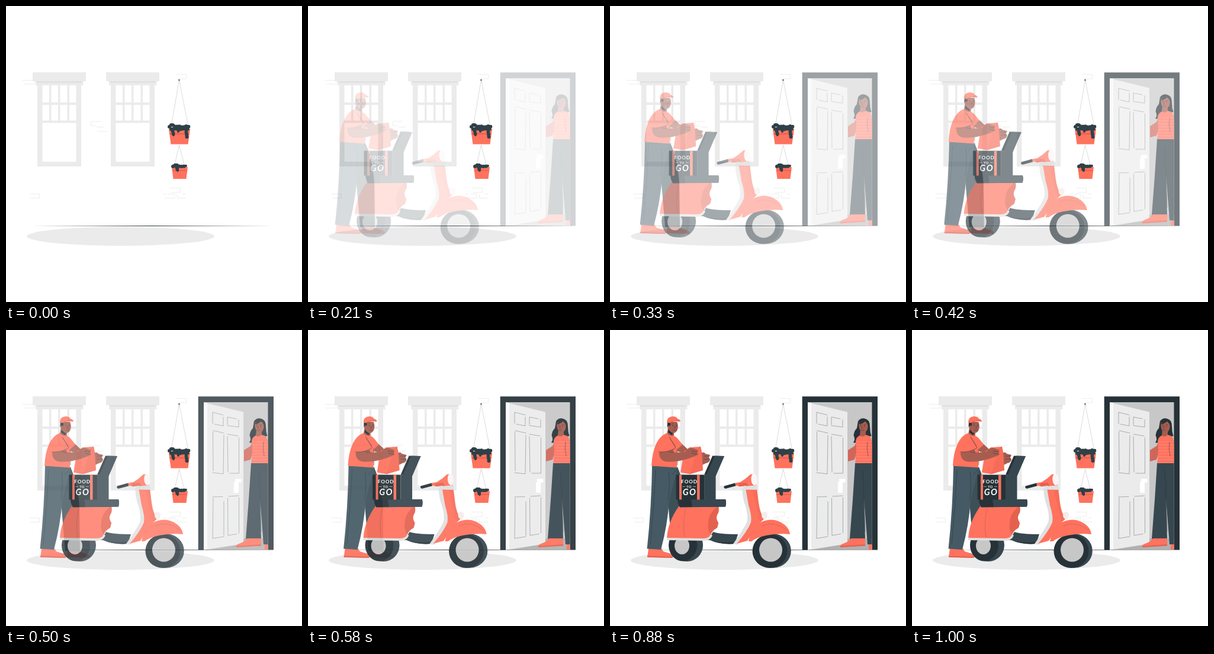
Write an HTML page that moves like this. It is 500 px wide and 500 px high and loops after 1.04 s.

```html
<!DOCTYPE html>
<html lang="en">
<head>
<meta charset="utf-8">
<title>Food delivery</title>
<style>
html, body { margin: 0; width: 100%; height: 100%; overflow: hidden; background: #fff; }
svg { display: block; width: 100%; height: 100%; }
.ink { fill: #263238; } .slate { fill: #37474f; } .coral { fill: #ff725e; } .shade { fill: #e4614f; }
.skin { fill: #a65d50; } .pale { fill: #ebebeb; } .white { fill: #fff; } .rim { fill: #c7c7c7; } .grey { fill: #e0e0e0; }
.thin { fill: none; stroke: #263238; stroke-width: .5; stroke-linecap: round; stroke-linejoin: round; }
.leaf { fill: none; stroke: #2f4047; stroke-linecap: round; stroke-linejoin: round; }
text { font-family: Lato, "Open Sans", sans-serif; font-weight: 700; fill: #fff; text-anchor: middle; }
</style>
</head>
<body>
<svg viewBox="0 0 500 500">
  <defs>
    <g id="window">
      <path class="pale" d="M45 112H135V127H45ZM50 127H130.500V134H50ZM53 134H127V271H53Z"/>
      <path class="grey" d="M50 127H130.500L127 129.500H53Z"/>
      <path class="white" d="M61.500 134H73V163H61.500ZM76.500 134H88V163H76.500ZM91.500 134H103.500V163H91.500ZM107 134H118.500V163H107ZM61.500 167H73V193.500H61.500ZM76.500 167H88V193.500H76.500ZM91.500 167H103.500V193.500H91.500ZM107 167H118.500V193.500H107ZM61.500 197.500H118.500V263H61.500Z"/>
    </g>
  </defs>

  <use href="#window"/>
  <use href="#window" x="124"/>
  <path fill="none" stroke="#e6e6e6" stroke-width=".7" d="M28 125.500H45M31 132H48V126M160 195H143.500V202.500H151M165 204.500H153M154 212H171M39 317.500H56.500V324.500H41M287 115.500H304.500V123H290M276 307.500H294.500V315H279M266 317.500H271M274 317.500H285V324.500H268M298 317.500H304M304 324.500H289.500V319"/>

  <ellipse class="pale" cx="193.500" cy="389" rx="158.500" ry="16"/>
  <path class="ink" d="M42 371.500L145 371.300L248 371.100L452 371.400V371.600L248 371.900L145 371.700Z"/>

  <path class="thin" stroke-opacity=".35" d="M280 198L292.500 125L307 199M285 268L292.500 235L301 268"/>
  <circle cx="292.500" cy="125" r="1.500" fill="#777"/>
  <path class="coral" d="M275 208H311L307.500 233.500H278.500ZM280 272H307L304.500 292H282.500Z"/>
  <path class="shade" d="M276 215H310L309.800 217H276.300ZM281 277H306L305.700 278.500H281.200Z"/>
  <g id="plants"></g>

  <g id="entry" opacity="0">
    <path class="ink" d="M324.700 112.300H452V371.500H324.700Z"/>
    <path class="rim" d="M334 122H442.500V371.500H334Z"/>
    <path fill="#b0b0b0" d="M401 352H442.500V371.500H340L401 361Z"/>
    <path class="pale" d="M339 123.500L401 138.500V361L340 370.500Z"/>
    <path fill="#fafafa" d="M334 122L340 123.500V370.500L334 371.500Z"/>
    <g class="thin" stroke-opacity=".7">
      <path d="M349 158V139L367 143.500M367 147V162L352 159M374 160V147L389 150M393 151.500V164L374 161.500"/>
      <path d="M350 170L368 174M349.500 172L350 238M368 178L367 243L349 241M374 176L392 179M393.500 182V242L378 242M374 180L375 240"/>
      <path d="M349 282L366 281.500M350 284L349 352L368 349M368 290V347M376 281L393 280M374.500 284L375 347L390 344.500M393.500 283V343"/>
    </g>
    <path class="white" d="M385 257H393V275H385ZM387 251.500H397.500V257.500H387Z"/>
    <path class="ink" d="M419 154Q423 148 430 149.500Q439 151 439 163Q439 172 441.500 179L430 182Q422 178 420 186Q416 192 411 190Q415 185 411.500 178Q413 169 417 166Z"/>
    <path class="skin" d="M423 168L432 168V178L428 182L422 178Z"/>
    <path class="skin" d="M420 157Q424 153 433 155Q437 160 435 167Q433 173.500 427 173Q420 171 420 157Z"/>
    <path class="ink" d="M419 159Q427 159 431 154L435 159L437 166V154L428 149.500Z"/>
    <path class="thin" d="M422 160L425 159M429 160L432 160M426 162L425 166H427M424 169Q427 171 429 169"/>
    <circle class="ink" cx="423.500" cy="162" r=".7"/><circle class="ink" cx="430" cy="162.500" r=".7"/>
    <path fill="#d0665a" d="M417 187L413 196L402 203V222L413 219L417 207Z"/>
    <path class="coral" d="M422 178Q427 182 432 177L438 179Q442 182 442.500 194V227H414L416 205L415 187Q416 181 422 178Z"/>
    <path fill="none" stroke="#ffa598" stroke-width=".5" d="M416 189H442M416 194H442M416 199H442M416 204H442M416 209H442M415 214H442M415 219H442M414 224H442"/>
    <path class="thin" d="M435 189Q433 200 436 213"/>
    <path class="slate" d="M414 225H442.500V363L435 362L429 285L431 353H405L410 287Z"/>
    <path class="thin" d="M427 238L429 285L431 340"/>
    <path class="coral" d="M407 352H431V364.500L389 367Q387 363 395 360.500Q404 357 407 352ZM438 362H442.500V371H437Q436 367 438 362Z"/>
    <path class="shade" d="M389 365L431 362V364.500L389 367Z"/>
  </g>

  <g id="rider" opacity="0">
    <path class="coral" d="M64 369H86L89 374L105 379Q107 384 104 385L62 383.500ZM108 371H127L129 375L144 380Q147 384 144 385L106 384Z"/>
    <path class="shade" d="M62 381.500L105 383L104 385L62 384Z"/>
    <path fill="#3d5058" d="M90 232H113Q125 258 128 300L129 374L104 373.500L96 279Z"/>
    <path fill="#455a64" d="M70 229L114 232Q105 262 99 288Q96 330 85 371L61.500 369.500Q69 300 70 229Z"/>
    <path class="thin" d="M98 240Q101 264 97 287M76 236Q73 300 67 362M112 235L104 244"/>
    <path class="skin" d="M108 190L119 191L132 203L126 209L107 203ZM97 164H107V180L101 182L95 176Z"/>
    <path class="ink" d="M98 168L105 174L104 178L97 173Z"/>
    <path class="coral" d="M95 174Q100 180 106 178Q114 182 121 194L113 201L112 232.500L69 229.500Q70 207 77 192Q84 178 95 174Z"/>
    <path class="thin" d="M99 181L109 196M112 201L113 228"/>
    <path class="skin" d="M97 155H112Q115 161 113 168Q111 174 105 174Q98 172 97 163Z"/>
    <path class="ink" d="M96 155L101 155L101 161L99 166L95.500 163Z"/>
    <circle class="skin" cx="98.500" cy="163.500" r="2.200"/>
    <path class="thin" d="M103 159L106 158M110 159L112 160M108 162L109 166H107M105 169Q108 171 111 168.500"/>
    <circle class="ink" cx="105" cy="161.500" r=".8"/><circle class="ink" cx="111" cy="162" r=".8"/>
    <path class="coral" d="M95 156.500Q94.500 147 104 146Q111 145.500 113 150Q118 151 118 154.500L110 154Q103 154 100 157Z"/>
    <path class="shade" d="M100 157Q103 152.500 112 152L118 154.500L110 154Q103 154 100 157Z"/>
    <path class="skin" d="M152 208Q158 205 160 209L168 211L166 215L168 219Q167 224 161 225L153 229Z"/>
    <path class="thin" d="M158 213L167 213M158 218L167 218"/>
    <path class="coral" d="M124 205L133 198.500L152 197L154 206L156 237L134 243.500L118 240.500Z"/>
    <path class="shade" d="M145 206L152 197L154 206L156 237L134 243.500Z" opacity=".35"/>
    <path class="thin" d="M133 198.500L146 203L152 197" opacity=".4"/>
    <path class="skin" d="M85 193L104 195L107 207L125 206Q130 199 137 199L146 202Q149 205 146 207L148 210L143 213L132 217Q114 223 96 222.500Q84 222 82 210Z"/>
    <path class="thin" d="M137 204L146 206M137 208L146 210M107 207L99 206"/>
    <path class="coral" d="M83 188L99 181L110 199Q98 207 81 206Z"/>
    <path class="thin" d="M81 206Q98 207 110 199L99 181"/>
  </g>

  <g id="scooter" opacity="0">
    <ellipse class="slate" cx="129" cy="363.500" rx="27" ry="27.500"/>
    <ellipse class="ink" cx="122" cy="363.500" rx="24" ry="27"/>
    <ellipse class="rim" cx="120.500" cy="364.500" rx="12.500" ry="14.500"/>
    <path class="slate" d="M157 355Q169 350 173 341Q184 345 215 345L210 361Q186 363 168 355Z"/>
    <path class="ink" d="M168 355Q186 361 211 358L210 361Q186 363 168 355Z"/>
    <path class="coral" d="M115 298H182Q184 307 180 312Q177 318 182 326L180 334Q171 339 169 346Q166 354 157 353L95 352Q96 325 115 298Z"/>
    <path class="shade" d="M182 298Q184 307 180 312Q177 318 182 326L180 334Q171 339 169 346Q163 337 165 325Q165 311 179 299Z"/>
    <path class="thin" stroke-opacity=".35" d="M127 300Q121 325 125 350"/>
    <path class="grey" d="M95 351L157 352Q167 352 169 345L172 347Q168 356 158 356L95 355Z"/>

    <path class="ink" d="M113 286H194Q196 291 194 298.500L117 299.500Q113 293 113 286Z"/>
    <path class="slate" d="M136 286H194Q196 291 194 298.500L138 299Z"/>
    <path class="ink" d="M158 244.500L172 212.500L192 213L177 246Z"/>
    <path class="slate" d="M162 244.500L176 212.500L192 213L177.500 247Z"/>
    <path class="ink" d="M110.500 244.500H158V286.500H110.500Z"/>
    <path class="slate" d="M158 244.500H177.500V286.500H158Z"/>
    <path class="coral" d="M116 244.500H120V286.500H116ZM146 244.500H150.500V286.500H146Z"/>
    <text x="133" y="259" font-size="8.300" letter-spacing=".8">FOOD</text>
    <text x="132.500" y="266.500" font-size="5.500" letter-spacing=".4">TO</text>
    <path class="white" d="M121 263.900H126V264.600H121ZM139 263.900H144V264.600H139Z"/>
    <text x="133.500" y="278.500" font-size="14.500" font-style="italic" letter-spacing="1.500">GO</text>

    <path class="grey" d="M222 267H231L240 319Q238 331 225 346L214 363L207 361Q222 341 230 325Q233 315 228 298Q223 286 222 267Z"/>
    <path class="coral" d="M228 267H247L250 292Q252 308 259 319L245 333L231 356L213 361Q231 340 237 325Q239 315 233 296Z"/>
    <path class="shade" d="M240 268H247L250 292Q252 308 259 319L253 324Q245 300 240 268Z" opacity=".3"/>
    <ellipse cx="260" cy="313" rx="5" ry="6.200" fill="#f7ecea"/>

    <ellipse class="slate" cx="274.500" cy="373" rx="30.300" ry="28.700"/>
    <ellipse class="ink" cx="269" cy="373.500" rx="29.500" ry="28.500"/>
    <ellipse class="rim" cx="270.500" cy="371.500" rx="19.500" ry="20"/>
    <path class="coral" d="M233 357Q237 333 255 324Q276 315 294 329Q302 336 303 345Q283 343 263 347Q247 350 238 357Z"/>
    <path class="thin" stroke-opacity=".35" d="M256 331Q276 321 298 338"/>

    <path class="ink" d="M192 263.500L210 258.500Q213 261 211 263.500L194 268Q190 267 192 263.500Z"/>
    <path class="coral" d="M210 258.500L219 257Q228 252 236 244L243 243L246 263L237 267L228 263L219 264.500L211 262.500Z"/>
    <path class="shade" d="M216 259L229 258L235 266L228 263L217 264Z"/>
    <path class="grey" d="M223 264L246 262.500Q249 266 247 270L226 269.500Z"/>
    <ellipse cx="242.500" cy="252.500" rx="5.200" ry="10" fill="#faf5f4" transform="rotate(-4 242.500 252.500)"/>
  </g>
</svg>
<script>
const get = id => document.getElementById(id);

// Foliage: a solid core with a beaded outline.
const vines = [
  "M276 204L280 200L286 204L292 203L298 205L304 203L309 204M279 208L286 207L292 209L300 207L308 208M281 208L283 218M291 209V212M304 209L305.500 221",
  "M282 271L287 268L293 271L299 271L304 270M288 272L290 278"
];
get("plants").innerHTML = vines.map(d =>
  `<path class="leaf" stroke-width="4" d="${d}"/>` +
  `<path class="leaf" stroke-width="6" stroke-dasharray="0 4" d="${d}"/>`).join("");

const LOOP = 1040, STEP = 1000 / 24, LEAD = 0.03, SLIDE = 20;
const curve = (s, a, b) => 3 * (1 - s) ** 2 * s * a + 3 * (1 - s) * s * s * b + s ** 3;

// cubic-bezier(.36, -.01, .5, 1.38)
function ease(x) {
  let lo = 0, hi = 1;
  for (let i = 0; i < 24; i++) {
    const mid = (lo + hi) / 2;
    if (curve(mid, 0.36, 0.5) < x) lo = mid; else hi = mid;
  }
  return curve(lo, -0.01, 1.38);
}

function draw(now) {
  const step = Math.floor((now % LOOP + 6) / STEP);
  const p = step < 2 ? 0 : ease(Math.min(1, step * STEP / 1000 + LEAD));
  for (const id of ["entry", "rider", "scooter"]) {
    get(id).setAttribute("opacity", Math.min(1, p));
    if (id !== "entry") get(id).setAttribute("transform", `translate(${SLIDE * (p - 1)} 0)`);
  }
}

const start = performance.now();
function tick() {
  draw(performance.now() - start);
  requestAnimationFrame(tick);
}
tick();
</script>
</body>
</html>
```
